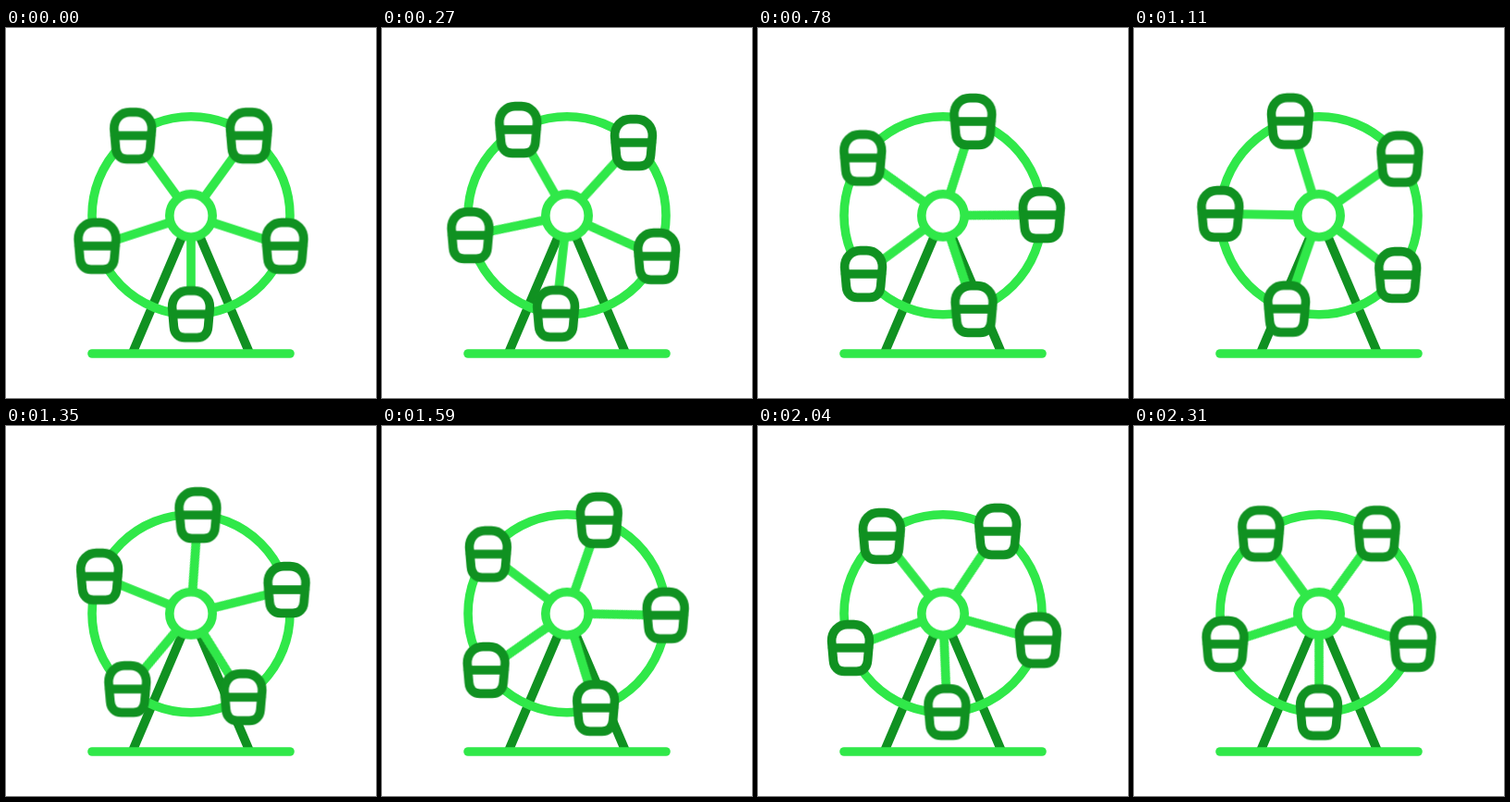
These frames come from a looping animation (400 by 400 pixels, 2.34 s). An HTML page:

```html
<!DOCTYPE html>
<html lang="en">
<head>
<meta charset="utf-8">
<title>Ferris wheel</title>
<style>
  html, body { margin: 0; width: 100%; height: 100%; overflow: hidden; background: #fff; }
  svg { display: block; width: 100%; height: 100%; }
  .light, .dark { fill: none; stroke-width: 9.6; stroke-linecap: round; stroke-linejoin: round; }
  .light { stroke: #30e849; }
  .dark { stroke: #109121; }
  .flat { stroke-linecap: butt; }
  .solid { fill: #fff; }
  .wheel, .level {
    transform-origin: 0 0;
    animation: turn 2340ms cubic-bezier(.333, 0, .4, 1) infinite;
  }
  /* cabins undo the wheel's rotation to stay upright */
  .level { animation-name: unturn; }
  @keyframes turn { from { transform: rotate(0deg); } to { transform: rotate(144deg); } }
  @keyframes unturn { from { transform: rotate(0deg); } to { transform: rotate(-144deg); } }
</style>
</head>
<body>
<svg viewBox="0 0 400 400">
  <defs>
    <g id="cabin" class="dark">
      <path class="solid" d="M-20.4 -7.5C-20.4 -18 -13 -25.4 -3.5 -25.4H3.5C13 -25.4 20.4 -18 20.4 -7.5L18.6 13.5C18 21 13.5 25.4 6.5 25.4H-6.5C-13.5 25.4 -18 21 -18.6 13.5Z"/>
      <path d="M-19.5 0H19.5"/>
    </g>
    <path id="spoke" class="light" d="M0 23V107"/>
  </defs>

  <path class="dark flat" d="M200 203L137.3 350M200 203L262.7 350"/>
  <path class="light" d="M93 352H307"/>

  <g transform="translate(200 202.7)">
    <circle class="light" r="107"/>
    <g class="wheel">
      <use href="#spoke"/>
      <use href="#spoke" transform="rotate(72)"/>
      <use href="#spoke" transform="rotate(144)"/>
      <use href="#spoke" transform="rotate(216)"/>
      <use href="#spoke" transform="rotate(288)"/>
    </g>
    <circle class="light solid" r="23.2"/>
    <g class="wheel">
      <g transform="translate(0 106.7)"><g class="level"><use href="#cabin"/></g></g>
      <g transform="rotate(72) translate(0 106.7) rotate(-72)"><g class="level"><use href="#cabin"/></g></g>
      <g transform="rotate(144) translate(0 106.7) rotate(-144)"><g class="level"><use href="#cabin"/></g></g>
      <g transform="rotate(216) translate(0 106.7) rotate(-216)"><g class="level"><use href="#cabin"/></g></g>
      <g transform="rotate(288) translate(0 106.7) rotate(-288)"><g class="level"><use href="#cabin"/></g></g>
    </g>
  </g>
</svg>
</body>
</html>
```
